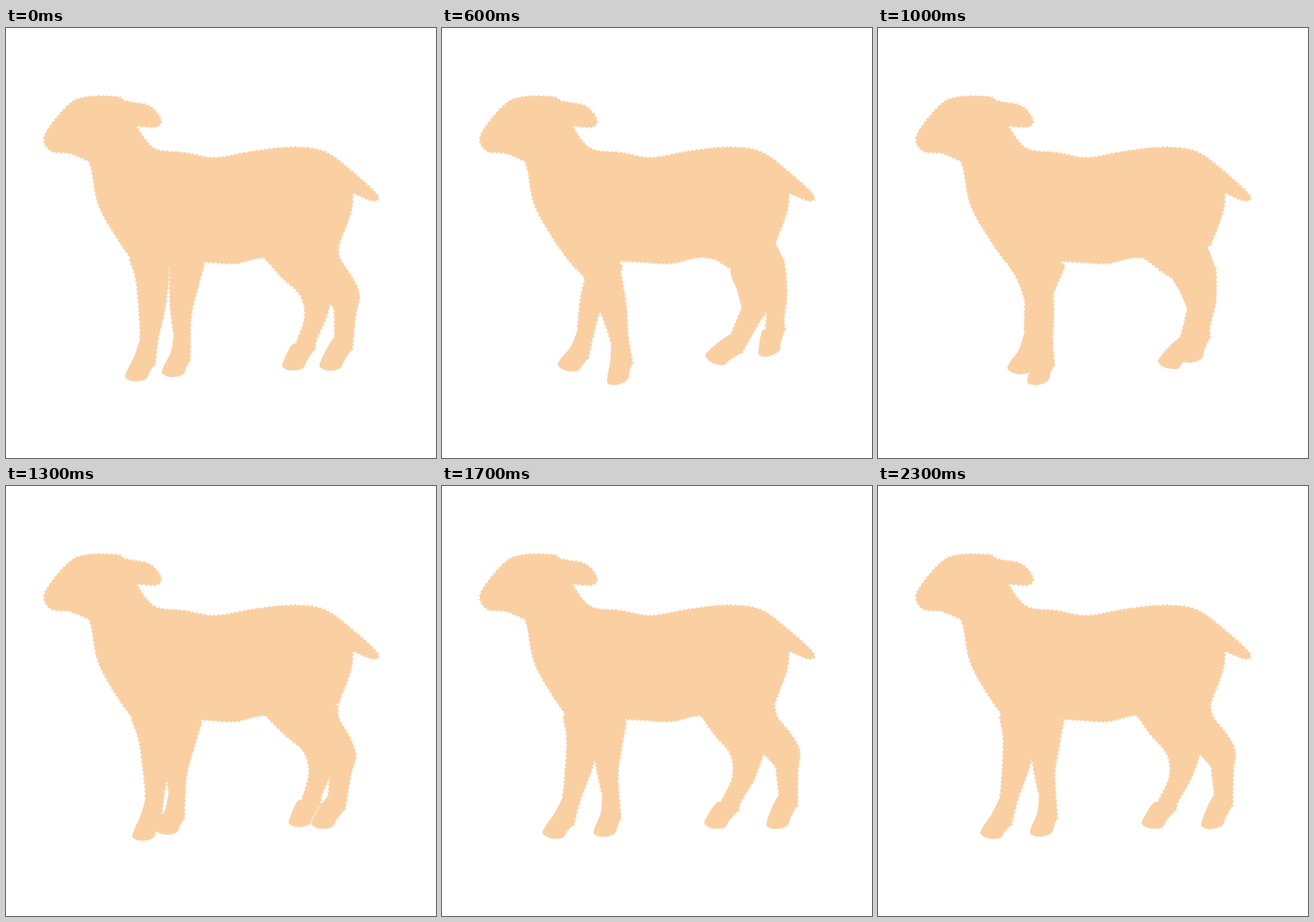
Write an HTML page with a canvas that moves like this. It is 600 px wide and 600 px high and loops after 2400 ms.

```html
<!DOCTYPE html>
<html lang="en">
<head>
<meta charset="utf-8">
<title>Walking lamb</title>
<style>
html, body { margin: 0; height: 100%; overflow: hidden; background: #fff; }
canvas { display: block; width: 600px; height: 600px; }
</style>
</head>
<body>
<canvas id="stage" width="600" height="600"></canvas>
<script>
const ctx = document.getElementById('stage').getContext('2d');
const LOOP = 2400, STEP = 100;
const CROSSED = 697, SPREAD = 1985, REST = 2 * CROSSED;

// Open curves that meet at corners; each ends where the next begins
const body = makePart([
  [116,186, 90,175, 64,172, 53,156, 63,135, 90,105, 115,96, 155,96, 167,102,
    200,109, 216,128, 209,138, 181,136.5],
  [181,136.5, 207,168, 250,174, 292,181, 345,172, 400,166.5, 445,173, 485,202,
    518,233, 512,241, 484,230],
  [484,230, 481,257, 464,303],
  [464,303, 410,325, 360,320, 320,328.5, 278,326.5, 240,327, 200,347],
  [200,347, 180,328, 153,290, 129,246, 120,200, 116,186]
]);

// Swings are [degrees, pivot x, pivot y]
const legs = [
  makeLeg({ front: [173,324, 182,355, 187,415, 187,435], toe: [167,488],
    rear: [208,470, 212,435, 222,390, 228,341], top: [225,300, 176,300],
    crossed: [-19.1, 228, 268], spread: [15.6, 176, 300] }),
  makeLeg({ front: [229,345, 229,385, 234,428], toe: [218,482],
    rear: [257,463, 258,405, 267,365, 277,328], top: [240,300, 227,320],
    crossed: [14.4, 243, 218], spread: [-10, 257, 545] }),
  makeLeg({ front: [360,320, 385,348, 410,372, 417,403, 405,440], toe: [386,473],
    rear: [431,448, 433,435, 446,406, 453,380, 457,356], top: [453,330, 440,300, 370,305],
    crossed: [-19.5, 360, 272], spread: [13.4, 390, 310] }),
  makeLeg({ front: [458,392, 459,430], toe: [438,473],
    rear: [483,448, 488,400, 493,373, 484,350, 466,322, 464,304], top: [425,310, 422,348, 441,370],
    crossed: [27.3, 440, 296], spread: [-10, 465, 305] })
];

// Smooth open curve through the points
function addCurve(path, flat) {
  const last = flat.length / 2 - 1;
  const at = i => {
    const k = Math.max(0, Math.min(last, i));
    return [flat[2 * k], flat[2 * k + 1]];
  };
  path.lineTo(...at(0));
  for (let i = 0; i < last; i++) {
    const [a, b, c, d] = [at(i - 1), at(i), at(i + 1), at(i + 2)];
    path.bezierCurveTo(b[0] + (c[0] - a[0]) / 6, b[1] + (c[1] - a[1]) / 6,
      c[0] - (d[0] - b[0]) / 6, c[1] - (d[1] - b[1]) / 6, ...c);
  }
}

function makePart(curves, woolly = curves) {
  const shape = new Path2D(), wool = new Path2D();
  curves.forEach(c => addCurve(shape, c));
  for (const c of woolly) {
    wool.moveTo(c[0], c[1]);
    addCurve(wool, c);
  }
  return { shape, wool };
}

// All four legs share one hoof, placed by its toe
function makeLeg({ front, toe, rear, top, crossed, spread }) {
  const hoof = [12,-30, 2,-10, 0,0, 12,5, 28,2, 34,-9].map((v, i) => v + toe[i % 2]);
  const foot = [...front.slice(-2), ...hoof, ...rear.slice(0, 2)];
  return { ...makePart([front, foot, rear, top], [front, rear]), crossed, spread };
}

function drawPart({ shape, wool }) {
  ctx.fill(shape);
  ctx.stroke(wool);
}

function draw(t) {
  ctx.clearRect(0, 0, 600, 600);
  ctx.fillStyle = ctx.strokeStyle = '#fad0a3';
  ctx.lineWidth = 3;
  ctx.lineCap = 'round';
  ctx.setLineDash([0, 6]);
  const [pose, peak, span] = t < REST ? ['crossed', CROSSED, CROSSED]
                                      : ['spread', SPREAD, SPREAD - REST];
  const amount = 1 - Math.abs(t - peak) / span;
  for (const leg of legs) {
    const [degrees, x, y] = leg[pose];
    ctx.save();
    ctx.translate(x, y);
    ctx.rotate(degrees * amount * Math.PI / 180);
    ctx.translate(-x, -y);
    drawPart(leg);
    ctx.restore();
  }
  drawPart(body);
}

const start = performance.now();
function tick() {
  const t = (performance.now() - start) % LOOP;
  draw(Math.floor(t / STEP) * STEP);
  requestAnimationFrame(tick);
}
tick();
</script>
</body>
</html>
```
